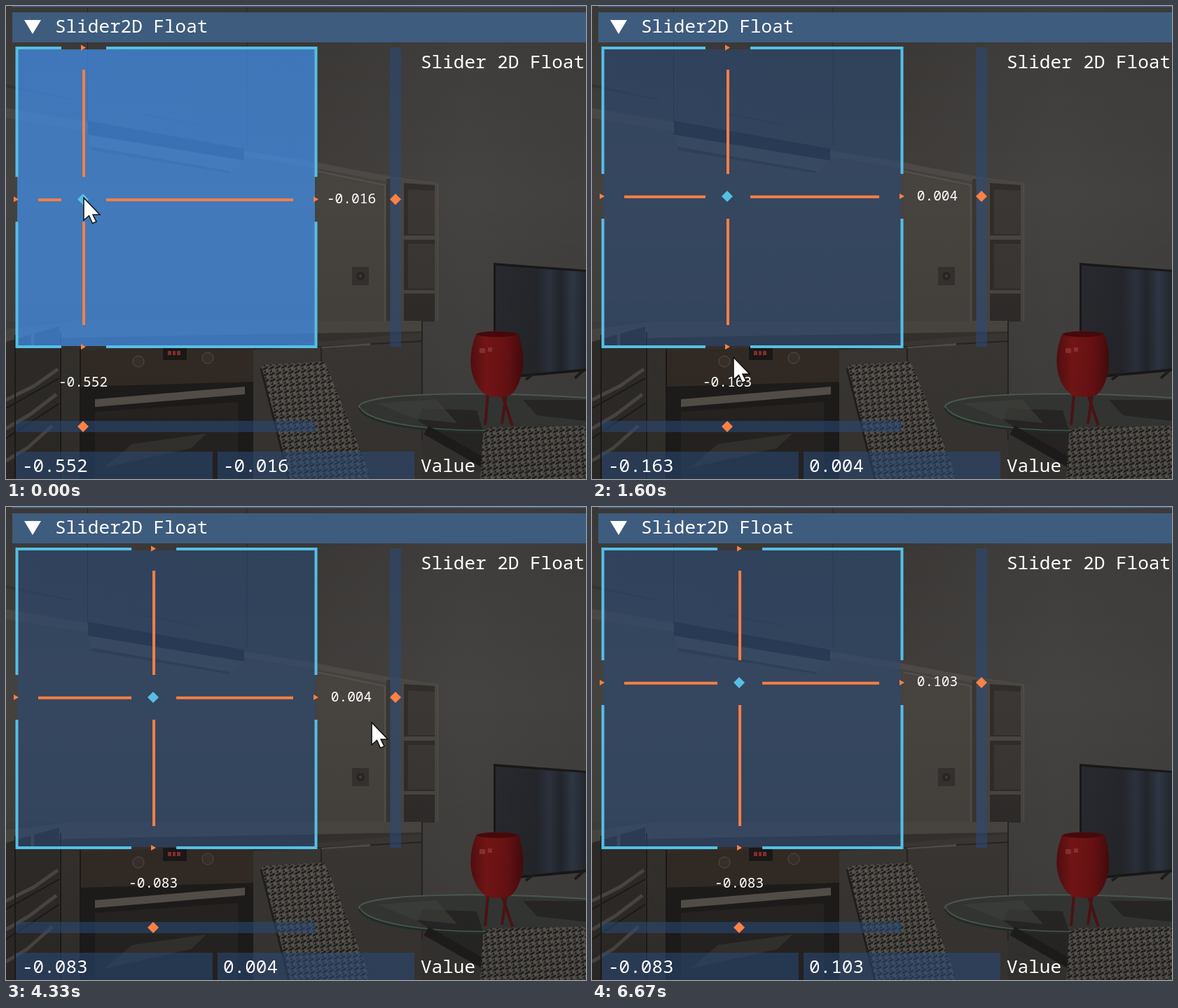
These frames come from a looping animation (828 by 676 pixels, 7.87 s). An HTML page:

```html
<!DOCTYPE html>
<html lang="en">
<head>
<meta charset="utf-8">
<title>Slider2D Float</title>
<style>
html, body { margin: 0; width: 100%; height: 100%; overflow: hidden; background: #403e3c; }
svg { display: block; width: 100vw; height: 100vh; }
text { font: 26px "Noto Sans Mono", "DejaVu Sans Mono", monospace; fill: #fff; white-space: pre; }
.small { font-size: 19.5px; text-anchor: middle; }
.frame { fill: rgba(41, 74, 122, .54); }
.hover { fill: rgba(66, 150, 250, .4); }
.active { fill: rgba(66, 150, 250, .67); }
.orange { fill: #ff8142; }
.cyan { fill: #56bfe3; }
</style>
</head>
<body>
<svg viewBox="0 0 828 676" preserveAspectRatio="none">
  <defs>
    <linearGradient id="wall">
      <stop offset="0" stop-color="#403f3e"/><stop offset=".5" stop-color="#3f3c3a"/>
      <stop offset=".8" stop-color="#454341"/><stop offset="1" stop-color="#42403f"/>
    </linearGradient>
    <linearGradient id="shade" x2="0" y2="1">
      <stop offset="0" stop-color="#000" stop-opacity=".1"/><stop offset=".4" stop-color="#000" stop-opacity="0"/>
      <stop offset="1" stop-color="#000" stop-opacity=".14"/>
    </linearGradient>
    <linearGradient id="screen">
      <stop offset="0" stop-color="#292b30"/><stop offset=".45" stop-color="#25272c"/>
      <stop offset=".6" stop-color="#2d333f"/><stop offset=".72" stop-color="#23262c"/>
      <stop offset=".85" stop-color="#303947"/><stop offset="1" stop-color="#25282d"/>
    </linearGradient>
    <linearGradient id="red">
      <stop offset="0" stop-color="#570e10"/><stop offset=".3" stop-color="#7b1718"/>
      <stop offset=".7" stop-color="#6d1214"/><stop offset="1" stop-color="#480b0d"/>
    </linearGradient>
    <pattern id="tooth" width="9" height="9" patternUnits="userSpaceOnUse" patternTransform="rotate(-5)">
      <path fill="#23211f" d="M0 0h9v9H0z"/>
      <path fill="#605c56" d="M0 0h4.5v3l2-2h2.5l-4.5 4.5H9V7H6.500L4.500 9H2.500l2-3.500H0z"/>
    </pattern>
  </defs>

  <g id="room">
    <path fill="url(#wall)" d="M0 0h828v676H0z"/>
    <path fill="#44423f" d="M0 145L117 164 340 206 443 222 545 245V450H0z"/>
    <path fill="#383634" d="M0 112l96 21v2L0 116zM195 153l83 17v2l-83-16z"/>
    <path fill="#4d4a47" d="M0 146l120 21v12L0 160zM340 207l104 17 103 19 70 10v5l-78-8-96-18-103-17z"/>
    <path fill="none" stroke="#2b2a29" d="M116.500 0V165M344 0V200"/>
    <path fill="#292929" d="M117 164l223 40v17L117 184z"/>
    <path fill="#4a4744" d="M117 184l223 37-20 17-198-37z"/>
    <path fill="#353332" d="M122 201l198 35v3l-198-33z"/>
    <path fill="#47433f" d="M444 234l96 20V450h-96z"/>
    <path fill="none" stroke="#55514c" stroke-width="2" d="M444 236l97 20V450M549 246V450M616 254V450"/>
    <path fill="#393633" d="M543 247h6v203h-6z"/>
    <path fill="#4a4641" d="M549 246l67 8v196h-67z"/>
    <path fill="#302d2b" d="M568 253l44 3v72h-44zM568 334h44v72h-44zM568 411h44v40h-44z"/>
    <path fill="#3a3734" d="M574 262l38 2v62h-38zM574 340h38v64h-38z"/>
    <path fill="#35322f" d="M494 373h24v26h-24z"/>
    <circle cx="506" cy="386" r="6" fill="#292725"/><circle cx="506" cy="386" r="2" fill="#45413d"/>

    <path fill="#36332f" d="M0 470L95 458l499-8v226H0z"/>
    <path fill="#4b4843" d="M0 462l95-12h499v15l-499 9L0 482z"/>
    <path fill="#3c3936" d="M353 488l241-21v209H353z"/>
    <path fill="none" stroke="#282624" stroke-width="2" d="M353 490l98-3 143-8M450 487V676M594 450V620"/>
    <path fill="#55514b" d="M450 487l70-5v3l-70 4z"/>
    <path fill="#352d27" d="M107 492l246-6v52l-246 6z"/>
    <path fill="#201e1d" d="M107 544l246-7v139H107z"/>
    <path fill="#292624" d="M127 580l204-14v110H127z"/>
    <path fill="#1c1919" d="M224 487h34v19h-34z"/>
    <path fill="#8e3030" d="M231 493h5v6h-5zM238 493h4v6h-4zM244 493h5v6h-5z"/>
    <g fill="#3b332d" stroke="#5a5048"><circle cx="189" cy="508" r="8"/><circle cx="288" cy="503" r="8"/></g>
    <path fill="#5a544e" d="M127 562l214-18v11l-214 18z"/>
    <path fill="#383532" d="M180 626l106-15-22 21-124 28z"/>
    <path fill="#302d2a" d="M0 480l76-22v218H0z"/>
    <path fill="none" stroke="#4f4b46" stroke-width="5" d="M0 563l40-20 34-24M0 604l34-20 38-29M0 650l30-18 36-32M38 458v28"/>
    <path fill="none" stroke="#1e1c1b" stroke-width="2" d="M0 575l76-43M0 618l76-50M13 470V676M78 466V676M106 490V676"/>

    <path fill="#1a1919" d="M696 367l132 10v145l-132 12z"/>
    <path fill="url(#screen)" d="M699 371l129 9v138l-129 12z"/>
    <path fill="none" stroke="#211f1e" stroke-width="4" d="M742 534l12-9M812 532l12-11"/>
    <path fill="#35322f" d="M594 560h234v116H594z" opacity=".7"/>
    <path fill="#383a37" d="M504 572C512 553 668 550 828 560V607H700C590 607 514 594 504 572z"/>
    <path fill="#2a2928" d="M594 575l78 3 20 64-18 8-86-58zM738 563h90v30l-70-8z"/>
    <path fill="#464944" d="M530 568l84-6 30 34-60-6z" opacity=".6"/>
    <path fill="none" stroke="#53605a" stroke-width="2" d="M828 560C668 550 512 553 504 572 514 594 590 607 690 607"/>
    <path fill="none" stroke="#24322c" stroke-width="3" d="M504 575c10 22 90 34 186 34"/>
    <path fill="none" stroke="#211f1e" stroke-width="14" d="M600 606l84 48"/>
    <path fill="none" stroke="#541416" stroke-width="4" d="M688 555l-4 44M708 555l15 45M714 555l-6 42"/>
    <path fill="url(#red)" d="M671 469Q701 460 732 469 741 500 737 523 731 548 720 556 701 561 685 556 668 543 664 518 661 494 671 469z"/>
    <ellipse cx="701" cy="469" rx="29" ry="4" fill="#4a0a0c"/>
    <path fill="#a04444" d="M676 489h8v7h-8zM688 488h6v6h-6z" opacity=".65"/>

    <path fill="url(#tooth)" d="M364 518q0-5 6-5l78-5q8 0 10 7l64 161H404z"/>
    <path fill="none" stroke="#23211f" stroke-width="3" d="M364 518l40 158"/>
    <path fill="url(#tooth)" d="M681 612q3-10 15-10l132-2v76H677z"/>
    <path fill="url(#shade)" d="M0 0h828v676H0z"/>
  </g>

  <path fill="#3e5f86" d="M9 0h819v1.500H9z"/>
  <path fill="#3e5c7e" d="M9 9h819v43H9z"/>
  <path fill="#fff" d="M26 20h24L38 40z"/>
  <text x="70" y="38">Slider2D Float</text>
  <text x="592" y="89">Slider 2D Float</text>
  <text x="592" y="666">Value</text>
  <path class="frame" d="M14 637h281v39H14zM302 637h281v39H302z"/>
  <text id="inX" x="23" y="666"></text>
  <text id="inY" x="310" y="666"></text>

  <path id="pad" d="M16 62h425v424H16z"/>
  <path id="barX" d="M14 593h428v16H14z"/>
  <path id="barY" d="M548 59h16v428h-16z"/>
  <path id="border" fill="none" stroke="#56bfe3" stroke-width="4"/>
  <path id="cross" fill="none" stroke="#f57f45" stroke-width="4"/>
  <path id="ticks" class="orange"/>
  <path id="knob" class="cyan"/>
  <path id="knobs" class="orange"/>
  <text id="tagX" class="small" y="544"></text>
  <text id="tagY" class="small" x="493"></text>
  <path id="mouse" fill="#fff" stroke="#111" stroke-width="1.500" d="M0 0V32L7.500 25.500 12.500 36.500 18 34 13 24H23z"/>
</svg>
<script>
const LOOP = 7870, STEP = 200 / 3;
const $ = id => document.getElementById(id);
const set = (id, name, v) => $(id).setAttribute(name, v);

// [ms, x value, y value]
const values = [
  [0, -.552, -.016], [67, -.552, -.006], [270, -.42, .4], [530, .2, .58], [800, .48, .2],
  [1000, -.05, .06], [1133, -.163, .014], [1200, -.163, .004], [2400, -.163, .004],
  [2600, -.68, .004], [2667, -.661, .004], [2733, -.642, .004], [3200, .7, .004],
  [3667, -.083, .004], [4933, -.083, .004], [5333, -.083, .6], [5400, -.083, .562],
  [5467, -.083, .5], [5800, -.083, -.45], [6267, -.083, .103]
];
// [ms, x, y] of the pointer while no button is held
const moves = [
  [1400, 194.5, 272], [1600, 202, 502], [1867, 438, 622], [2200, 194, 602], [2400, 194, 602],
  [3733, 203, 588], [3867, 203, 588], [4333, 522, 308], [4600, 556, 272], [4933, 556, 272],
  [6267, 541, 256], [6533, 541, 256], [6600, 348, 549]
];

// Smooth curve through the keys that never overshoots
function track(keys, t, c) {
  const last = keys.length - 1;
  if (t <= keys[0][0]) return keys[0][c];
  if (t >= keys[last][0]) return keys[last][c];
  const i = keys.findIndex(k => k[0] > t) - 1;
  const slope = j => j < 0 || j >= last ? 0 : (keys[j + 1][c] - keys[j][c]) / (keys[j + 1][0] - keys[j][0]);
  const tangent = j => {
    const a = slope(j - 1), b = slope(j);
    return a * b > 0 ? 2 * a * b / (a + b) : 0;
  };
  const d = keys[i + 1][0] - keys[i][0], s = (t - keys[i][0]) / d, r = 1 - s;
  return keys[i][c] * r * r * (1 + 2 * s) + keys[i + 1][c] * s * s * (3 - 2 * s)
    + d * s * r * (tangent(i) * r - tangent(i + 1) * s);
}

const toX = v => 227.8 + 213.4 * v;
const toY = v => 272.9 - 213.4 * v;
const within = (t, a, b) => t >= a - 5 && t < b - 5;
const diamond = (x, y) => `M${x - 8} ${y}l8-8 8 8-8 8z`;
const tick = (x, y) => `M${x - 3} ${y - 4}l7 4-7 4z`;
const split = (a, b, at) => [Math.max(a, at - 32), Math.min(b, at + 32)];

function row(y, a, b, x) {
  const [l, r] = split(a, b, x);
  return `M${a} ${y}H${l}M${r} ${y}H${b}`;
}
function column(x, a, b, y) {
  const [u, d] = split(a, b, y);
  return `M${x} ${a}V${u}M${x} ${d}V${b}`;
}

// The widget trails the pointer by one step during a drag
function pointer(t) {
  const x = toX(track(values, t + STEP, 1)), y = toY(track(values, t + STEP, 2));
  if (within(t, 0, 1400)) return [x + 1, y];
  if (within(t, 2400, 3733)) return [x + 1, 602];
  if (within(t, 4933, 6267)) return [554, y];
  return [track(moves, t, 1), track(moves, t, 2)];
}

function draw(time) {
  const t = Math.floor((time % LOOP + 4) / STEP) * STEP;
  const vx = track(values, t, 1), vy = track(values, t, 2);
  const x = toX(vx), y = toY(vy), [mx, my] = pointer(t);

  set('pad', 'class', within(t, 0, 1467) ? 'active' : 'frame');
  set('barX', 'class', within(t, 2467, 3733) ? 'active' : within(t, 2133, 2467) ? 'hover' : 'frame');
  set('barY', 'class', within(t, 4733, 6267) ? 'active' : within(t, 4533, 4733) ? 'hover' : 'frame');

  set('border', 'd', row(60, 14, 444, x + 1) + row(487, 14, 444, x + 1)
    + column(15.5, 58, 489, y) + column(442.5, 58, 489, y));
  set('cross', 'd', row(y + .8, 46, 410, x + 1) + column(x + 1, 91, 456, y));
  set('ticks', 'd', tick(x, 59.5) + tick(x, 487) + tick(14, y) + tick(442, y));
  set('knob', 'd', diamond(x, y));
  set('knobs', 'd', diamond(x, 601) + diamond(556, y));

  $('inX').textContent = $('tagX').textContent = vx.toFixed(3);
  $('inY').textContent = $('tagY').textContent = vy.toFixed(3);
  set('tagX', 'x', x);
  set('tagY', 'y', y + 5.5);
  set('mouse', 'transform', `translate(${mx} ${my})`);
  set('mouse', 'visibility', within(t, 0, 6667) ? 'visible' : 'hidden');
}

const start = performance.now();
function tickFrame(now) {
  draw(Math.max(0, now - start));
  requestAnimationFrame(tickFrame);
}
draw(0);
requestAnimationFrame(tickFrame);
</script>
</body>
</html>
```
